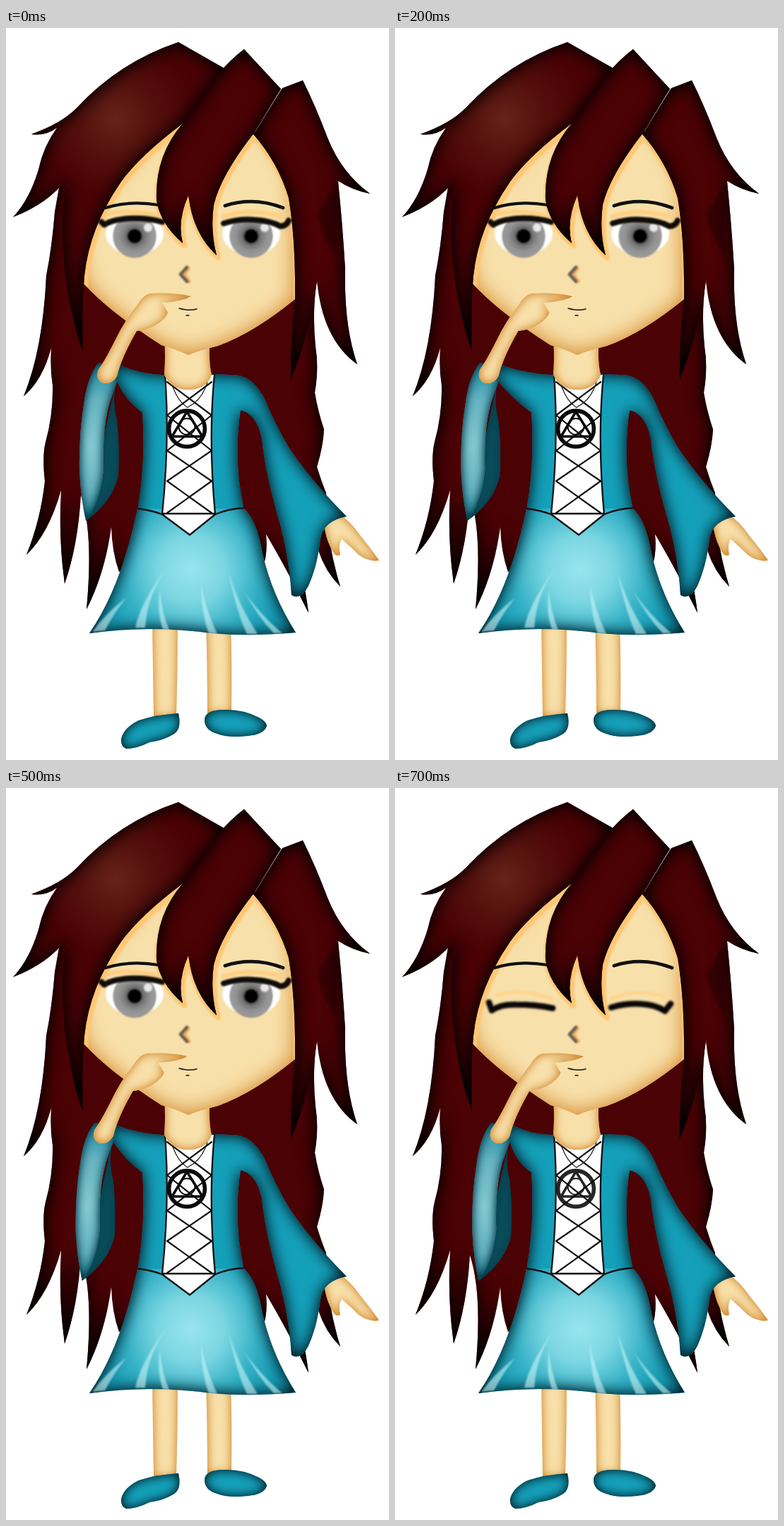
An HTML page for the animation above (800 ms loop, 542x1034 px).

```html
<!DOCTYPE html>
<html lang="en">
<head>
<meta charset="utf-8">
<title>Thoughtful girl</title>
<style>
  html, body { margin: 0; height: 100%; overflow: hidden; background: #fff; }
  svg { display: block; width: 100%; height: 100%; }
</style>
</head>
<body>
<script>
const REGION = 'filterUnits="userSpaceOnUse" x="-60" y="-60" width="662" height="1154" color-interpolation-filters="sRGB"';

// Shades a shape inward from its own edge.
const innerGlow = (id, color, blur, strength) => `
  <filter id="${id}" ${REGION}>
    <feFlood flood-color="${color}"/>
    <feComposite in2="SourceAlpha" operator="out"/>
    <feGaussianBlur stdDeviation="${blur}"/>
    <feComponentTransfer><feFuncA type="linear" slope="${strength}"/></feComponentTransfer>
    <feComposite in2="SourceAlpha" operator="in"/>
    <feMerge><feMergeNode in="SourceGraphic"/><feMergeNode/></feMerge>
  </filter>`;

const radial = (id, cx, cy, r, ...stops) => `
  <radialGradient id="${id}" gradientUnits="userSpaceOnUse" cx="${cx}" cy="${cy}" r="${r}">
    ${stops.map(([at, color]) => `<stop offset="${at}" stop-color="${color}"/>`).join('')}
  </radialGradient>`;

const shape = (d, fill, filter, extra = '') =>
  `<path d="${d}" fill="${fill}" ${filter ? `filter="url(#${filter})"` : ''} ${extra}/>`;

const line = (d, width, color = '#111', filter = '') =>
  `<path d="${d}" fill="none" stroke="${color}" stroke-width="${width}" stroke-linecap="round" stroke-linejoin="round" ${filter ? `filter="url(#${filter})"` : ''}/>`;

const SKIN = '#f8e0aa', MAROON = '#4b0205', TEAL = '#15a0ba';

const backHair = `M80 200Q74 230 69 260Q65 310 57 350Q52 455 25 520Q52 497 64 452Q62 480 66 505Q67 545 56 585
  Q51 605 55 640Q49 695 29 744Q60 715 78 653Q74 720 83 785Q102 730 106 660Q124 715 114 821
  Q140 770 149 705Q150 740 160 768L200 770L340 700Q350 720 363 765Q371 740 368 715Q395 760 428 826
  Q425 800 418 770Q440 750 442 738Q452 768 473 789Q461 750 456 710L453 657
  Q446 640 440 620Q449 590 450 567Q441 540 437 515Q443 480 438 450Q433 400 440 357L430 200L250 100Z`;
const leftHair = `M244 20Q160 48 100 113Q78 135 36 150Q56 153 72 141Q53 167 46 200Q33 243 10 267
  Q60 248 87 212C70 290 86 395 109 457Q107 395 111 350Q118 282 163 217Q190 180 250 135L309 57Z`;
const middleHair = `M337 30L389 86L352 147Q304 208 294 250Q289 287 298 321Q265 291 258 237
  Q242 273 250 304Q217 275 213 242Q211 180 250 135Q297 59 337 30Z`;
const rightHair = `M420 74L391 85L350 150Q385 190 400 240Q410 300 409 385Q402 445 403 497
  Q430 430 440 357Q448 440 497 475Q478 420 480 340Q476 275 470 216Q490 229 515 234
  Q475 205 455 155Q438 110 420 74Z`;
const face = `M250 110L350 110L409 210L409 383Q350 431 300 449Q272 456 258 462
  Q238 453 220 448Q145 400 110 361L95 260Z`;
const panel = 'M225 490H295Q286 580 296 687L260 716L221 687Q232 580 225 490Z';

// The near shoulder stays with the torso while its outer end follows the arm.
const dress = dx => `M222 490Q190 489 ${163 + dx} 477L${146 + dx} 486L${158 + dx} 501Q170 527 193 543
  Q198 615 186 681H337Q321 610 332 540Q354 544 362 580C366 620 376 660 389 705Q401 752 404 801
  Q417 809 428 788Q440 762 445 722Q449 696 482 690Q432 640 400 592Q380 558 367 526Q349 488 318 490
  L296 489Z`;
const skirt = `M186 679H337Q355 695 363 742Q376 800 410 854
  Q350 860 290 855Q205 843 118 855Q163 790 186 679Z`;

const streaks = ['M228 762Q191 810 183 847L197 847Q200 800 228 762', 'M218 793Q213 825 222 849L231 850Q220 825 218 793',
  'M276 785Q277 830 287 855L299 856Q282 820 276 785', 'M315 770Q327 827 341 856L356 856Q329 815 315 770',
  'M337 795Q355 830 379 855L391 855Q355 824 337 795', 'M170 805Q142 826 122 853L140 851Q153 826 170 805']
  .map(d => shape(d + 'Z', '#c9f5f8', 'soft', 'opacity=".6"')).join('');

const laces = [[500, 547], [547, 597], [597, 640], [640, 685]]
  .map(([a, b]) => line(`M228 ${a}L291 ${b}M291 ${a}L228 ${b}`, 2.2)).join('');

const openEye = (x, lash, id) => `
  <clipPath id="${id}"><rect x="${x - 50}" y="270" width="100" height="60"/></clipPath>
  <g clip-path="url(#${id})">
    <ellipse cx="${x}" cy="291" rx="41" ry="29" fill="#fff" filter="url(#soft)"/>
    <circle cx="${x}" cy="294" r="30.5" fill="url(#${id}Iris)" filter="url(#soft)"/>
    <circle cx="${x}" cy="294" r="9.5" filter="url(#soft)"/>
    <circle cx="${x + 19}" cy="282" r="6" fill="#fff" opacity=".8" filter="url(#soft)"/>
  </g>
  ${line(lash, 8, '#100c08', 'soft')}`;

const closedEye = lash => line(lash, 11, '#6e615080', 'soft') + line(lash, 7.5, '#0b0907', 'soft');
const iris = (id, x) => radial(id, x, 294, 31, [.25, '#444'], [.45, '#777'], [.7, '#929292'], [.9, '#9a9a9a'], [1, '#848484']);

document.body.innerHTML = `
<svg viewBox="0 0 542 1034" preserveAspectRatio="none">
  <defs>
    ${innerGlow('hairEdge', '#090000', 13, 1.45)}
    ${innerGlow('faceEdge', '#d8963f', 15, 1.35)}
    ${innerGlow('limbEdge', '#d6923c', 7, 1.4)}
    ${innerGlow('dressEdge', '#04313d', 11, 1.5)}
    ${innerGlow('sleeveEdge', '#063f4d', 7, 1.4)}
    ${innerGlow('shoeEdge', '#04313d', 8, 1.4)}
    <filter id="soft" ${REGION}><feGaussianBlur stdDeviation="1.1"/></filter>
    ${radial('leftSheen', 155, 128, 110, [0, '#65231a'], [.5, '#54100d'], [1, MAROON])}
    ${radial('skirtSheen', 262, 765, 135, [0, '#98e5ee'], [.35, '#7bd6e2'], [.7, '#35b1c6'], [1, '#159bb4'])}
    ${radial('sleeveSheen', 121, 590, 110, [0, '#84c8d2'], [.6, '#66b3c1'], [1, '#2590a6'])}
    ${iris('leftEyeIris', 182)}${iris('rightEyeIris', 347)}
    <clipPath id="faceClip"><path d="${face}"/></clipPath>
    <clipPath id="panelClip"><path d="${panel}"/></clipPath>
  </defs>

  ${shape(backHair, MAROON, 'hairEdge')}
  ${shape('M207 840H243Q243 905 241 972L209 974Q208 905 207 840Z', SKIN, 'limbEdge')}
  ${shape('M283 840H318Q320 900 319 968L285 968Q285 900 283 840Z', SKIN, 'limbEdge')}
  ${shape('M244 968Q249 990 238 997Q224 1006 203 1009Q185 1018 170 1018Q162 1015 163 1004Q167 988 188 978Q212 970 244 968Z', TEAL, 'shoeEdge')}
  ${shape('M281 977Q282 963 308 963Q335 962 358 974Q369 980 369 986Q365 998 342 1000Q314 1003 299 997Q281 992 281 977Z', TEAL, 'shoeEdge')}

  ${shape('M449 695Q458 681 472 687Q487 696 503 719Q520 740 528 752Q514 755 499 744Q487 732 475 722Q470 730 473 744Q466 749 460 735Q452 720 449 695Z', SKIN, 'limbEdge')}
  <g filter="url(#dressEdge)">
    <path id="dress" fill="${TEAL}"/>
    ${shape(skirt, 'url(#skirtSheen)')}
  </g>
  ${streaks}
  ${shape(panel, '#fff')}
  <g clip-path="url(#panelClip)">${laces}${line('M235 504Q243 528 257 536Q278 525 285 500', 1.2)}</g>
  ${line('M225 490Q232 580 221 687L260 716L296 687Q286 580 295 490M221 686H296M187 679Q205 681 221 687M296 687Q315 679 336 678', 2.3)}
  <g id="emblem" fill="none" stroke="#090909" stroke-linejoin="round">
    <circle cx="256" cy="566" r="25.4" stroke-width="5.6"/>
    <path d="M256 542L235 577H278Z" stroke-width="3.6"/>
    <circle cx="256" cy="563" r="11.5" stroke-width="2"/>
  </g>
  ${shape('M224 435H289Q286 470 291 490Q283 511 258 511Q234 511 224 490Q226 465 224 435Z', SKIN, 'limbEdge')}

  ${shape(face, SKIN, 'faceEdge')}
  <g clip-path="url(#faceClip)"><g transform="translate(2 3)">
    ${[leftHair, middleHair, rightHair].map(d => line(d, 8, '#ffc673', 'soft')).join('')}
  </g></g>
  <g id="open">
    ${line('M145 262Q180 255 222 267M308 266Q345 254 388 266', 6, '#ffcf82', 'soft')}
    ${openEye(182, 'M135 274L139 278Q149 271 174 269Q200 268 221 274', 'leftEye')}
    ${openEye(347, 'M308 276Q330 269 352 271Q374 272 388 280Q397 280 400 272', 'rightEye')}
  </g>
  <g id="closed">
    ${line('M145 292Q180 282 222 298M306 298Q345 281 384 296', 5, '#ffd58f', 'soft')}
    ${closedEye('M133 303L137 314Q150 305 172 306Q200 306 223 311')}
    ${closedEye('M306 310Q326 304 347 305Q369 306 382 315L390 305')}
  </g>
  ${line('M141 254Q175 243 216 250', 4.2)}
  ${line('M310 251Q350 238 392 254', 4.8)}
  ${line('M258 340L252 348L259 358', 5, '#ecac5c', 'soft')}
  ${line('M256 338L247 348L256 358', 4.5, '#655d53', 'soft')}
  ${line('M245 396Q258 400 270 397M255 406H259', 1.4)}

  ${shape(leftHair, 'url(#leftSheen)', 'hairEdge')}
  ${shape(rightHair, MAROON, 'hairEdge')}
  ${shape('M441 262Q449 300 468 321Q465 270 470 216Z', '#160002', 'soft', 'opacity=".4"')}
  ${shape(middleHair, MAROON, 'hairEdge')}
  ${line('M389 87L353 146', .7, '#8c7773')}

  <g id="arm">
    ${shape('M157 494Q149 525 157 554Q161 590 159 632Q151 669 113 696Q132 650 136 590Z', '#0a4d5b', 'sleeveEdge')}
    ${shape('M131 473Q115 492 110 532Q103 575 104 627Q106 665 113 696Q133 670 138 624Q136 565 147 528L159 494Q149 475 131 473Z', 'url(#sleeveSheen)', 'sleeveEdge')}
    ${shape('M262 379Q239 373 204 375Q194 377 186 391Q168 413 154 442Q140 470 131 482Q126 495 136 501Q149 505 157 492Q163 466 185 428Q202 426 213 419Q227 410 229 402L221 388Q251 386 262 379Z', SKIN, 'limbEdge')}
  </g>
</svg>`;

const part = id => document.getElementById(id);
const STEP = 5.3;
let shown = -1;

function pose(step) {
  const phase = (step + 1) % 8;
  const dx = STEP * (1 - Math.min(phase, 8 - phase));
  const blink = step === 7;
  part('arm').setAttribute('transform', `translate(${dx})`);
  part('dress').setAttribute('d', dress(dx));
  part('open').style.display = blink ? 'none' : '';
  part('closed').style.display = blink ? '' : 'none';
  part('emblem').setAttribute('opacity', blink ? .88 : 1);
}

function tick() {
  const step = Math.floor(performance.now() / 100) % 8;
  if (step !== shown) pose(shown = step);
  requestAnimationFrame(tick);
}
tick();
</script>
</body>
</html>
```
